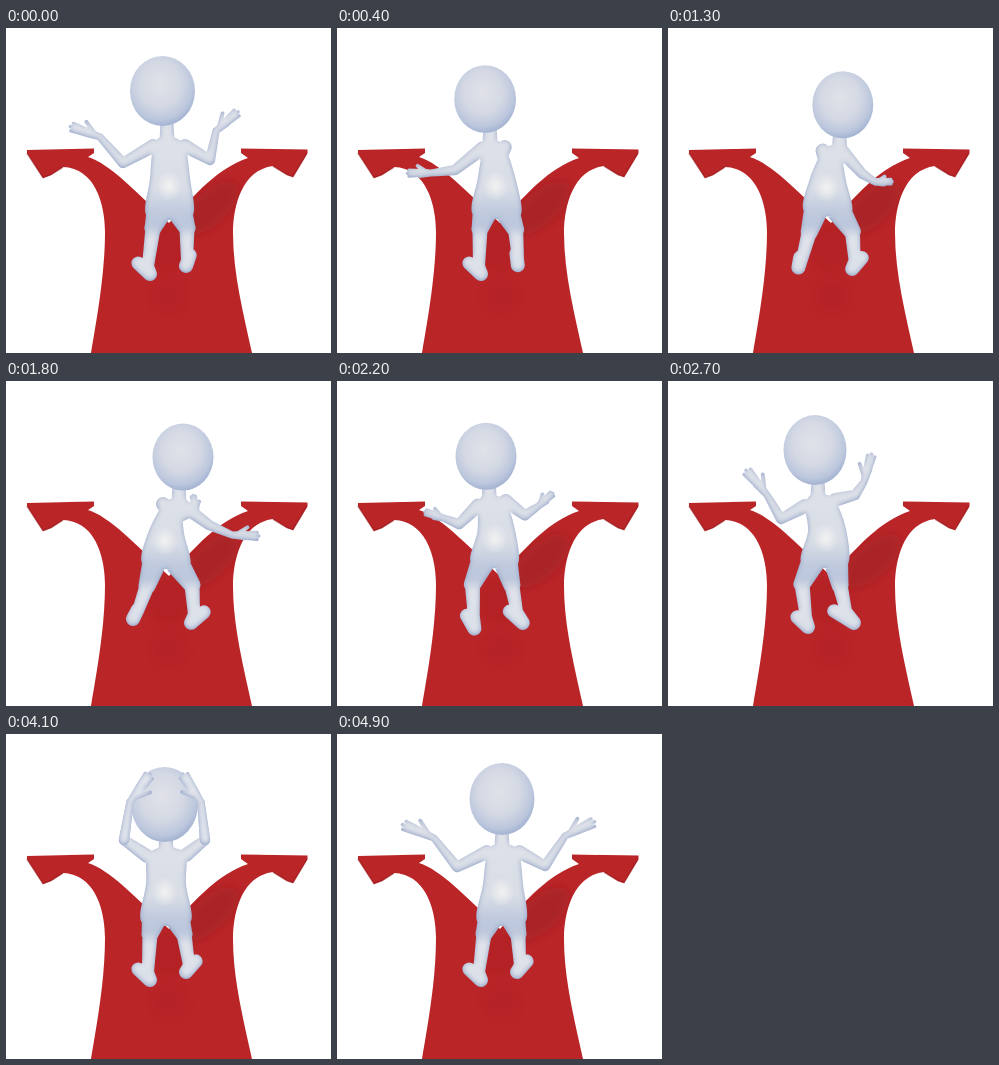
Write an HTML page that moves like this. It is 325x325 px and loops after 5500 ms.

```html
<!DOCTYPE html>
<html lang="en">
<head>
<meta charset="utf-8">
<title>Crossroads</title>
<style>
html, body { margin: 0; width: 100%; height: 100%; overflow: hidden; background: #fff; }
svg { display: block; width: 100%; height: 100%; }
</style>
</head>
<body>
<svg viewBox="0 0 325 325">
  <defs>
    <radialGradient id="ball" cx=".46" cy=".4" r=".62">
      <stop offset="0" stop-color="#e0e2e8"/>
      <stop offset=".5" stop-color="#d5d9e4"/>
      <stop offset=".82" stop-color="#bcc7dd"/>
      <stop offset="1" stop-color="#9fafd0"/>
    </radialGradient>
    <linearGradient id="skin" gradientUnits="userSpaceOnUse" x1="0" y1="100" x2="0" y2="250">
      <stop offset="0" stop-color="#dfe2e9"/>
      <stop offset=".42" stop-color="#d8dde6"/>
      <stop offset=".57" stop-color="#bfcade"/>
      <stop offset=".66" stop-color="#bcc7dc"/>
      <stop offset=".74" stop-color="#e0e3ea"/>
      <stop offset="1" stop-color="#dbe0e9"/>
    </linearGradient>
    <radialGradient id="glow">
      <stop offset="0" stop-color="#f4f4f2" stop-opacity=".9"/>
      <stop offset="1" stop-color="#f4f4f2" stop-opacity="0"/>
    </radialGradient>
    <filter id="clay" color-interpolation-filters="sRGB">
      <feGaussianBlur in="SourceGraphic" stdDeviation="2.6" result="soft"/>
      <feOffset in="soft" dx="-.4" dy="-.6" result="lit"/>
      <feFlood flood-color="#8c9dc4"/>
      <feComposite in2="SourceAlpha" operator="in" result="shade"/>
      <feComposite in="lit" in2="shade" operator="atop"/>
    </filter>
    <filter id="blur" x="-50%" y="-50%" width="200%" height="200%"><feGaussianBlur stdDeviation="5"/></filter>
    <clipPath id="onRoad"><use href="#road"/></clipPath>
  </defs>

  <path id="road" fill="#ba2528" d="M85 325C91 290 99 245 99 204C99 176 89 140 57 139L45 147L37 150L21 125V122L88 120.500V125L82 129C104 136 128 162 163 195C190 165 212 140 242 130L235 125V120.500L301.500 121.500V125L287 149L281 147L267 138C236 142 227 178 227 205C227 246 238 288 246 325Z"/>
  <path fill="none" stroke="#99191c" stroke-opacity=".6" stroke-width="1.500" d="M21 125L37 149.500L45 146.500L57 139M301 125L287 148.500L281 146.500L267 138"/>
  <g clip-path="url(#onRoad)">
    <g filter="url(#blur)" fill="#741a1c">
      <ellipse cx="204" cy="180" rx="36" ry="17" opacity=".24" transform="rotate(-42 204 180)"/>
      <ellipse cx="162" cy="220" rx="22" ry="24" opacity=".08"/>
      <ellipse cx="164" cy="268" rx="22" ry="22" opacity=".06"/>
    </g>
  </g>

  <path id="body" fill="url(#skin)" filter="url(#clay)"/>
  <ellipse id="shine" rx="13" ry="15" fill="url(#glow)"/>
  <ellipse id="head" fill="url(#ball)"/>
  <path id="grip" fill="#e2e5ec" filter="url(#clay)"/>
</svg>
<script>
const $ = id => document.getElementById(id);

// Joints: s shoulder, e elbow, w wrist, t fingertip, b waist edge, h hip edge,
// k knee, a ankle, c heel, o toe; second letter is the side.
const shrug = {
  head: [165, 65, 32.5, 36], neck: [165, 105],
  sl: [150, 118], el: [120, 133], wl: [97, 104], tl: [64, 90],
  sr: [182, 118], er: [208, 132], wr: [228, 102], tr: [259, 87],
  bl: [146, 150], br: [186, 150], hl: [140, 187], hr: [189, 187],
  kl: [147, 200], al: [142, 238], cl: [144, 246], ol: [132, 235],
  kr: [181, 200], ar: [183, 231], cr: [180, 238], or: [190, 227]
};
const shrugOff = {
  ...shrug, head: [156.5, 63, 32.5, 35], neck: [161, 104],
  sl: [147, 118], el: [117, 135], wl: [94, 109], tl: [63, 98],
  sr: [179, 118], er: [204, 132], wr: [210, 103], tr: [233, 83],
  bl: [144, 150], br: [184, 150], hr: [187, 187],
  ar: [181, 232], or: [184, 227]
};
const left = {
  ...shrug, head: [150, 71.5, 30.5, 33.5], neck: [154, 107],
  sl: [145, 121], el: [122, 143], wl: [101, 153], tl: [79, 155],
  sr: [165, 119], er: [150, 140], wr: [132, 138], tr: [120, 132],
  bl: [140, 150], br: [177, 150], hl: [134, 185], hr: [183, 187],
  kl: [142, 201], kr: [178, 202], ar: [181, 230], cr: [181, 237], or: [178, 225]
};
const farLeft = {
  ...left, head: [146, 73, 30.5, 33.5], neck: [151, 108],
  el: [118, 144], wl: [94, 154], tl: [71, 157]
};
const right = {
  ...left, head: [177, 76, 30.5, 33.5], neck: [173, 112],
  sl: [157, 123], el: [166, 140], wl: [190, 130], tl: [187, 114],
  sr: [176, 124], er: [203, 144], wr: [226, 154], tr: [254, 155],
  bl: [142, 152], br: [178, 152], hl: [136, 182], hr: [184, 184],
  kl: [141, 205], al: [132, 230], cl: [127, 238], ol: [132, 228],
  kr: [186, 204], ar: [188, 233], cr: [185, 242], or: [198, 231]
};
const farRight = {
  ...right, head: [181, 78, 30.5, 33.5], neck: [176, 113],
  er: [205, 147], wr: [226, 158], tr: [251, 159]
};
const raise = {
  ...shrug, head: [147, 69, 31.5, 35], neck: [150, 108],
  sl: [137, 125], el: [113, 138], wl: [99, 114], tl: [77, 88],
  sr: [167, 119], er: [187, 114], wr: [196, 101], tr: [204, 72],
  bl: [140, 150], br: [178, 148], hl: [133, 181], hr: [180, 183],
  kl: [134, 203], al: [138, 236], cl: [140, 246], ol: [129, 236],
  kr: [172, 204], ar: [178, 230], cr: [186, 242], or: [166, 230]
};
const lean = {
  ...raise, head: [142, 75, 30.5, 33.5], neck: [147, 109],
  el: [111, 144], wl: [86, 139], tl: [62, 135],
  er: [184, 132], wr: [195, 118], tr: [207, 101], cl: [140, 250]
};
const hold = {
  ...shrug, head: [159, 70.5, 33.5, 37.5], neck: [160, 108],
  sl: [141, 122], el: [118, 106], wl: [125, 68], tl: [142, 43],
  sr: [180, 121], er: [199, 106], wr: [195, 68], tr: [177, 42],
  bl: [140, 150], br: [180, 150], hl: [135, 187], hr: [185, 187],
  kl: [144, 200], kr: [178, 200]
};
const lift = {
  ...mix(raise, hold, .5), head: [153, 67, 32, 36],
  el: [114, 127], wl: [111, 95], tl: [101, 64],
  er: [197, 112], wr: [203, 93], tr: [212, 62]
};
const holdLeft = {
  ...hold, head: [158.5, 70.5, 33.5, 37.5], wl: [124, 68], tl: [145, 39], tr: [176, 39]
};
const holdRight = {
  ...hold, head: [160, 71, 33.5, 37], wl: [125, 70], tl: [140, 46], tr: [179, 44]
};

const keys = [
  [0, shrugOff], [500, farLeft], [800, farLeft], [900, left],
  [1400, farRight], [1700, farRight], [1800, right],
  [2300, lean], [2500, lean], [2700, raise], [2900, lift],
  [3100, holdLeft], [3400, hold], [3700, holdRight], [4100, holdLeft],
  [4300, hold], [4900, shrug], [5500, shrug]
];

function mix(a, b, u) {
  const out = {};
  for (const k in a) out[k] = a[k].map((v, i) => v + (b[k][i] - v) * u);
  return out;
}
const between = (a, b, u) => [a[0] + (b[0] - a[0]) * u, a[1] + (b[1] - a[1]) * u];
const pt = (x, y) => x.toFixed(2) + ' ' + y.toFixed(2);

// Rounded limb whose radius goes from p to q.
function limb(a, p, b, q) {
  const dx = b[0] - a[0], dy = b[1] - a[1], len = Math.hypot(dx, dy) || 1;
  const nx = dy / len, ny = -dx / len;
  return `M${pt(a[0] + nx * p, a[1] + ny * p)}L${pt(b[0] + nx * q, b[1] + ny * q)}` +
    `A${q} ${q} 0 0 1 ${pt(b[0] - nx * q, b[1] - ny * q)}` +
    `L${pt(a[0] - nx * p, a[1] - ny * p)}A${p} ${p} 0 0 1 ${pt(a[0] + nx * p, a[1] + ny * p)}Z`;
}

function blob(pts) {
  const n = pts.length, at = i => pts[(i + n) % n];
  let d = 'M' + pt(...pts[0]);
  for (let i = 0; i < n; i++) {
    const [a, b, c, e] = [at(i - 1), at(i), at(i + 1), at(i + 2)];
    d += `C${pt(b[0] + (c[0] - a[0]) / 6, b[1] + (c[1] - a[1]) / 6)} ` +
      `${pt(c[0] - (e[0] - b[0]) / 6, c[1] - (e[1] - b[1]) / 6)} ${pt(...c)}`;
  }
  return d + 'Z';
}

function hand(w, t, side) {
  const reach = (turn, k) => {
    const c = Math.cos(turn) * k, s = Math.sin(turn) * k;
    const x = t[0] - w[0], y = t[1] - w[1];
    return [w[0] + x * c - y * s, w[1] + x * s + y * c];
  };
  let d = limb(w, 3.4, reach(0, .45), 4.8);
  [-.13, 0, .13].forEach(a => d += limb(reach(a, .45), 2.6, reach(a, a ? .9 : .95), 1.8));
  return d + limb(reach(side * .2, .2), 2.6, reach(side * .5, .62), 1.9);
}

const forearm = (p, s) => limb(p['e' + s], 5.2, p['w' + s], 3.6) +
  hand(p['w' + s], p['t' + s], s === 'l' ? 1 : -1);

function side(p, s) {
  const hip = between(p.hl, p.hr, s === 'l' ? .25 : .75);
  return limb(p['s' + s], 7, p['e' + s], 5.2) + forearm(p, s) +
    limb(hip, 12, p['k' + s], 8.6) + limb(p['k' + s], 7.6, p['a' + s], 6) +
    limb(p['a' + s], 6, p['c' + s], 7) + limb(p['c' + s], 7, p['o' + s], 6.8);
}

function torso(p) {
  const [x, y] = between(p.hl, p.hr, .5);
  const [nx, ny] = p.neck;
  return blob([[nx, ny - 2], [nx + 7, ny + 5], p.sr, p.br, p.hr, [x, y + 5], p.hl, p.bl, p.sl, [nx - 7, ny + 5]]) +
    limb([nx, ny - 8], 6.5, [nx, ny + 8], 7.5);
}

function set(el, attrs) {
  for (const k in attrs) el.setAttribute(k, attrs[k]);
}

function poseAt(t) {
  let i = 0;
  while (i < keys.length - 2 && keys[i + 1][0] <= t) i++;
  const [t0, a] = keys[i], [t1, b] = keys[i + 1];
  return mix(a, b, (t - t0) / (t1 - t0));
}

function draw(t) {
  const p = poseAt(t);
  const [cx, cy, rx, ry] = p.head;
  const [x, y] = between(p.bl, p.br, .47);
  set($('body'), { d: torso(p) + side(p, 'l') + side(p, 'r') });
  set($('shine'), { cx: x, cy: y + 8 });
  set($('head'), { cx, cy, rx, ry });
  set($('grip'), { d: t >= 3000 && t < 4500 ? forearm(p, 'l') + forearm(p, 'r') : '' });
}

const LOOP = 5500, STEP = 100;
const start = performance.now();
let last = -1;
function tick() {
  const t = Math.floor((performance.now() - start) % LOOP / STEP) * STEP;
  if (t !== last) draw(last = t);
  requestAnimationFrame(tick);
}
tick();
</script>
</body>
</html>
```
